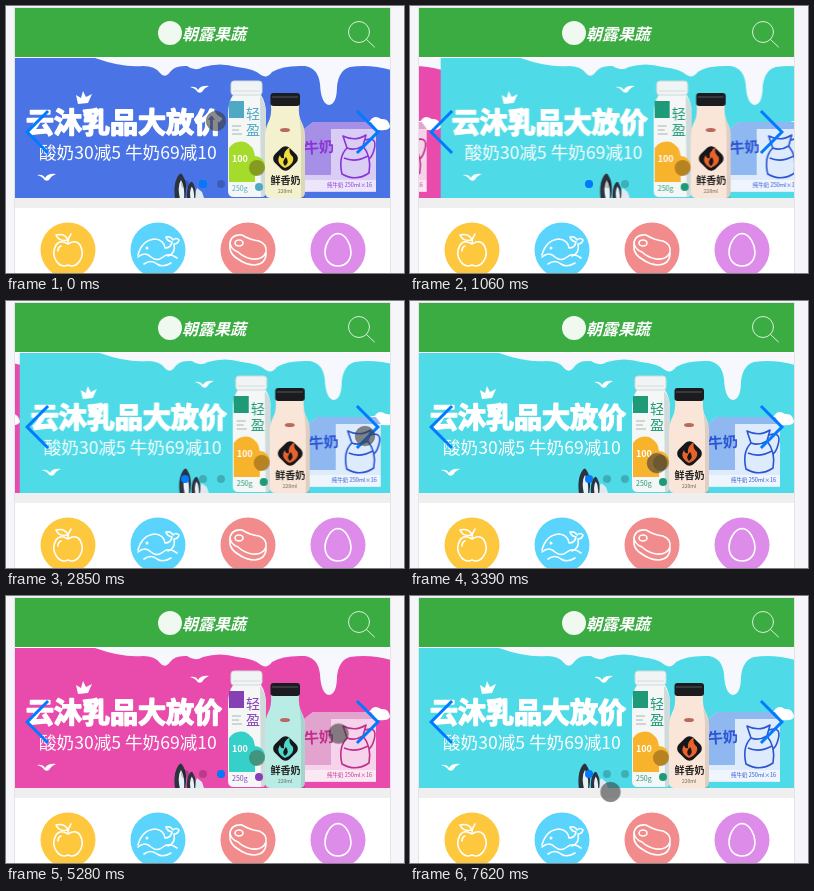
Recreate the animation shown at these times as an HTML page. Size 398 by 267 pixels, loop 8080 ms.

```html
<!DOCTYPE html>
<html lang="zh-CN">
<head>
<meta charset="utf-8">
<title>Fresh shop carousel</title>
<style>
html, body { margin: 0; width: 100%; height: 100%; overflow: hidden; background: #f6f6fa; }
svg { display: block; width: 398px; height: 267px; }
text { font-family: "Noto Sans CJK SC", "Noto Sans CJK", "Noto Sans", sans-serif; }
.line { fill: none; stroke: #fff; stroke-width: 1.6; stroke-linecap: round; stroke-linejoin: round; }

.blue { --bg: #4a73e6; --fruit: #a5dc2c; --mark: #4fa9c4; --milk: #f4f1cf; --flame: #f0dc3a; --box: #d9cdf6; --side: #a68fe6; --ink: #8a35d6; }
.pink { --bg: #e84bac; --fruit: #35d0c8; --mark: #8440b4; --milk: #b9ece4; --flame: #4fd8ca; --box: #f6d3ea; --side: #e3a3cf; --ink: #c02f8c; }
.cyan { --bg: #4edbe7; --fruit: #f8b32c; --mark: #1f9a78; --milk: #fae6d8; --flame: #e8622c; --box: #deebfc; --side: #8fb8f0; --ink: #2c55d4; }

.track, .active, .touch { animation: 8080ms infinite; }
.track { animation-name: slide; animation-timing-function: ease; }
.active { animation-name: dot; animation-timing-function: step-end; }
.touch { animation-name: touch; animation-timing-function: linear; }

@keyframes slide {
  0%, 6.436% { transform: translateX(0); }
  10.149%, 10.52% { transform: translateX(-375px); }
  14.233%, 15.718% { transform: translateX(-750px); }
  19.431%, 21.894% { transform: translateX(-1125px); }
  25.606%, 32.116% { transform: translateX(-1500px); }
  35.829%, 52.475% { transform: translateX(-1875px); }
  56.188%, 78.243% { transform: translateX(-2625px); }
  81.955%, 100% { transform: translateX(-1875px); }
}
@keyframes dot {
  0%, 15.718% { transform: translateX(18px); }
  6.436%, 21.894%, 52.475% { transform: translateX(36px); }
  10.52%, 32.116%, 78.243%, 100% { transform: translateX(0); }
}
@keyframes touch {
  0%, 4.45% { transform: translate(210px, 115px); opacity: 1; }
  4.46%, 28.9% { transform: translate(374px, 128px); opacity: 0; }
  29% { transform: translate(374px, 128px); opacity: 1; }
  30.5%, 37% { transform: translate(359px, 135px); }
  42.5% { transform: translate(235px, 165px); }
  44.9%, 46.95% { transform: translate(201px, 182px); }
  47%, 50.8% { transform: translate(211px, 177px); }
  50.9%, 52.6% { transform: translate(213px, 177px); }
  54.4% { transform: translate(234px, 176px); }
  63.2%, 63.8% { transform: translate(360px, 130px); }
  73.9% { transform: translate(182px, 179px); }
  76.7%, 88.6% { transform: translate(179px, 178px); }
  91.2%, 94.2% { transform: translate(201px, 195px); }
  94.3%, 100% { transform: translate(200.5px, 196px); opacity: 1; }
}
</style>
</head>
<body>
<svg viewBox="0 0 398 267">
  <defs>
    <clipPath id="window"><rect x="9" y="52" width="375" height="140"/></clipPath>
    <clipPath id="card"><rect width="376" height="140"/></clipPath>

    <g id="penguin">
      <path d="M-5 13Q-7-2-2-10Q1-15 3-10Q8-2 5 13Z" fill="#2b333e"/>
      <path d="M0 13Q-3 0 1-6Q5 0 4 13Z" fill="#e8f1f5"/>
    </g>
    <path id="bird" d="M-10-3Q-4-4-2 0Q1-5 9-4Q4-2 2 2Q-2 4-4 0Q-6-2-10-3Z" fill="#fff"/>

    <g id="slide" clip-path="url(#card)">
      <rect width="376" height="140" style="fill:var(--bg)"/>
      <path d="M80 0Q108 10 128 8Q140 8 145 15Q150 21 155 14Q160 7 172 8Q180 14 188 9Q205 4 222 9Q240 11 246 17Q252 21 257 14Q268 7 290 8Q303 10 305 26Q306 46 314 47Q322 46 322 28Q324 12 335 9Q355 6 376 12V0Z" fill="#f6f8fd"/>
      <path d="M347 69Q348 62 355 63Q359 56 366 61Q374 60 375 69Q373 73 364 72H352Q347 73 347 69Z" fill="#fff"/>
      <use href="#bird" x="185" y="32"/>
      <use href="#bird" x="32" y="120"/>
      <path d="M61 37l5 3 2-7 3 6 6-3-4 9-10 1z" fill="#fff"/>

      <text x="11" y="74.500" font-size="28" font-weight="900" fill="#fff" stroke="#fff" stroke-width="1.6" stroke-linejoin="round">云沐乳品大放价</text>
      <text x="24" y="101" font-size="17.6" fill="#fff">酸奶30减5 牛奶69减10</text>

      <path d="M178 140l4-10 5 4 2 6z" fill="#dfeaf0"/>
      <use href="#penguin" x="165" y="128"/>
      <use href="#penguin" transform="translate(176 133) scale(.75)"/>

      <path d="M289 71l9-7h58l5 7v63h-72z" style="fill:var(--box)"/>
      <path d="M289 71l9-7h58l5 7zM289 71h27v46h-27z" style="fill:var(--side)"/>
      <path d="M289 122h72v11h-72z" fill="#fff" opacity=".5"/>
      <text x="289" y="95" font-size="15" font-weight="900" transform="rotate(-4 300 92)" style="fill:var(--ink)">牛奶</text>
      <g fill="none" stroke-width="1.6" stroke-linejoin="round" style="stroke:var(--ink)">
        <path d="M328 78Q340 84 351 77L348 88Q357 99 354 115Q341 124 327 116Q323 99 332 90Z"/>
        <path d="M350 82Q363 78 359 92Q357 99 354 101M329 100Q340 105 353 98M332 90Q340 93 348 88"/>
      </g>
      <text x="312" y="129" font-size="5.500" style="fill:var(--ink)">纯牛奶 250ml×16</text>

      <path d="M218 37Q213 44 213 57V133Q213 139 219 139H245Q251 139 251 133V57Q251 44 246 37Z" fill="#f4f7f6"/>
      <path d="M245 38Q251 44 251 57V133Q251 139 246 139Z" fill="#cfdada"/>
      <rect x="216" y="23" width="31" height="14" rx="3" fill="#f1f4f4" stroke="#cfd8da"/>
      <path d="M218 33h27" stroke="#d3dcdd"/>
      <rect x="214" y="43" width="15" height="17" style="fill:var(--mark)"/>
      <g font-size="14" style="fill:var(--mark)">
        <text x="231" y="61">轻</text>
        <text x="231" y="77">盈</text>
      </g>
      <path d="M217 68h9M217 72h7M217 76h10" stroke="#a8b4b2"/>
      <path d="M214 90Q220 82 230 84Q239 88 240 98V124H214Z" style="fill:var(--fruit)"/>
      <circle cx="240" cy="108" r="10" style="fill:var(--fruit)"/>
      <circle cx="242" cy="110" r="8" fill="#543a10" opacity=".4"/>
      <text x="217" y="104" font-size="9" font-weight="700" fill="#fff">100</text>
      <text x="217" y="133" font-size="7" style="fill:var(--mark)">250g</text>
      <circle cx="244" cy="129" r="4" style="fill:var(--mark)"/>

      <path d="M256 47Q257 58 253 65Q250 71 250 80V134Q250 140 256 140H284Q290 140 290 134V80Q290 71 287 65Q283 58 284 47Z" style="fill:var(--milk)"/>
      <path d="M284 60Q290 70 290 82V140H286V80Q286 68 284 60Z" fill="#000" opacity=".1"/>
      <rect x="255.500" y="35" width="29.500" height="13" rx="3" fill="#1b1c1f"/>
      <path d="M257 39h26" stroke="#55575c"/>
      <ellipse cx="270" cy="72" rx="5" ry="2" fill="#b96a5c"/>
      <rect x="260" y="90" width="21" height="21" rx="6" transform="rotate(45 270.500 100.500)" fill="#16171a"/>
      <path d="M270 110Q260 105 265 97Q266 101 269 100Q268 93 275 89Q273 95 278 99Q280 106 270 110Z" style="fill:var(--flame)"/>
      <path d="M270 108Q266 104 271 99Q275 104 270 108Z" fill="#16171a"/>
      <text x="255.500" y="126" font-size="10" font-weight="900" fill="#222">鲜香奶</text>
      <text x="263" y="135" font-size="5" fill="#665">220ml</text>
    </g>
  </defs>

  <rect width="398" height="267" fill="#f6f6fa"/>
  <path d="M8.500 267V1.500H384.500V267" fill="none" stroke="#e4e4e8"/>
  <rect x="9" y="2" width="375" height="265" fill="#fff"/>
  <rect x="9" y="2" width="375" height="49" fill="#3aac42"/>
  <rect x="9" y="192" width="375" height="10" fill="#efefef"/>

  <circle cx="164" cy="27" r="12" fill="#f0f9f0"/>
  <text x="176" y="34" font-size="16" font-weight="700" font-style="italic" fill="#fff">朝露果蔬</text>
  <g class="line" style="stroke-width:1" opacity=".8">
    <circle cx="353" cy="26" r="10.500"/>
    <path d="M360.500 33.500L368.500 41"/>
  </g>

  <circle cx="62" cy="244" r="27.500" fill="#fdc83d"/>
  <circle cx="152" cy="244" r="27.500" fill="#5ad4fc"/>
  <circle cx="242" cy="244" r="27.500" fill="#f28b8b"/>
  <circle cx="332" cy="244" r="27.500" fill="#dd8cea"/>
  <g class="line">
    <path d="M62 238Q54 233 50 239Q45 248 51 256Q56 262 62 259Q68 262 73 256Q79 248 74 239Q70 233 62 238Z"/>
    <path d="M62 237Q62 232 65 228M62 234Q59 227 50 229Q53 236 62 234M52 245Q52 241 55 240"/>
    <path d="M132 249Q136 234 149 233Q158 234 159 242Q165 242 166 236Q161 235 160 231Q165 230 167 234Q170 231 173 234Q172 238 168 238Q170 247 162 250"/>
    <path d="M132 251Q139 245 145 251Q151 256 157 251Q163 246 171 252M138 258Q145 253 151 258Q157 262 165 257"/>
    <circle cx="141" cy="242" r=".7"/>
    <path d="M224 236Q226 228 236 229Q244 234 253 235Q261 238 260 246Q257 254 246 253Q237 251 232 246Q224 243 224 236Z"/>
    <path d="M224 237V243Q225 249 232 253Q240 259 249 259Q260 258 260 247"/>
    <ellipse cx="233" cy="237" rx="4" ry="3"/>
    <path d="M332 227.500C340 228 345 239 345 246C345 255 339 260 332 260S319 255 319 246C319 239 324 228 332 227.500Z"/>
  </g>

  <g clip-path="url(#window)">
    <g class="track">
      <g transform="translate(9 52)">
        <use class="blue" href="#slide"/>
        <use class="pink" href="#slide" x="375"/>
        <use class="cyan" href="#slide" x="750"/>
        <use class="blue" href="#slide" x="1125"/>
        <use class="pink" href="#slide" x="1500"/>
        <use class="cyan" href="#slide" x="1875"/>
        <use class="blue" href="#slide" x="2250"/>
        <use class="pink" href="#slide" x="2625"/>
      </g>
    </g>
  </g>

  <g fill="#007aff">
    <path transform="translate(19 104)" d="M0 22L22 0l2.100 2.100L4.200 22l19.900 19.900L22 44Z"/>
    <path transform="translate(347 104)" d="M27 22L5 44l-2.100-2.100L22.800 22L2.900 2.100L5 0Z"/>
  </g>
  <g fill="#000" fill-opacity=".2">
    <circle cx="179" cy="178" r="4"/>
    <circle cx="197" cy="178" r="4"/>
    <circle cx="215" cy="178" r="4"/>
  </g>
  <circle class="active" cx="179" cy="178" r="4" fill="#007aff"/>
  <circle class="touch" r="9.800" fill="#3c3c3c" fill-opacity=".6" stroke="#444" stroke-opacity=".4"/>
</svg>
</body>
</html>
```
